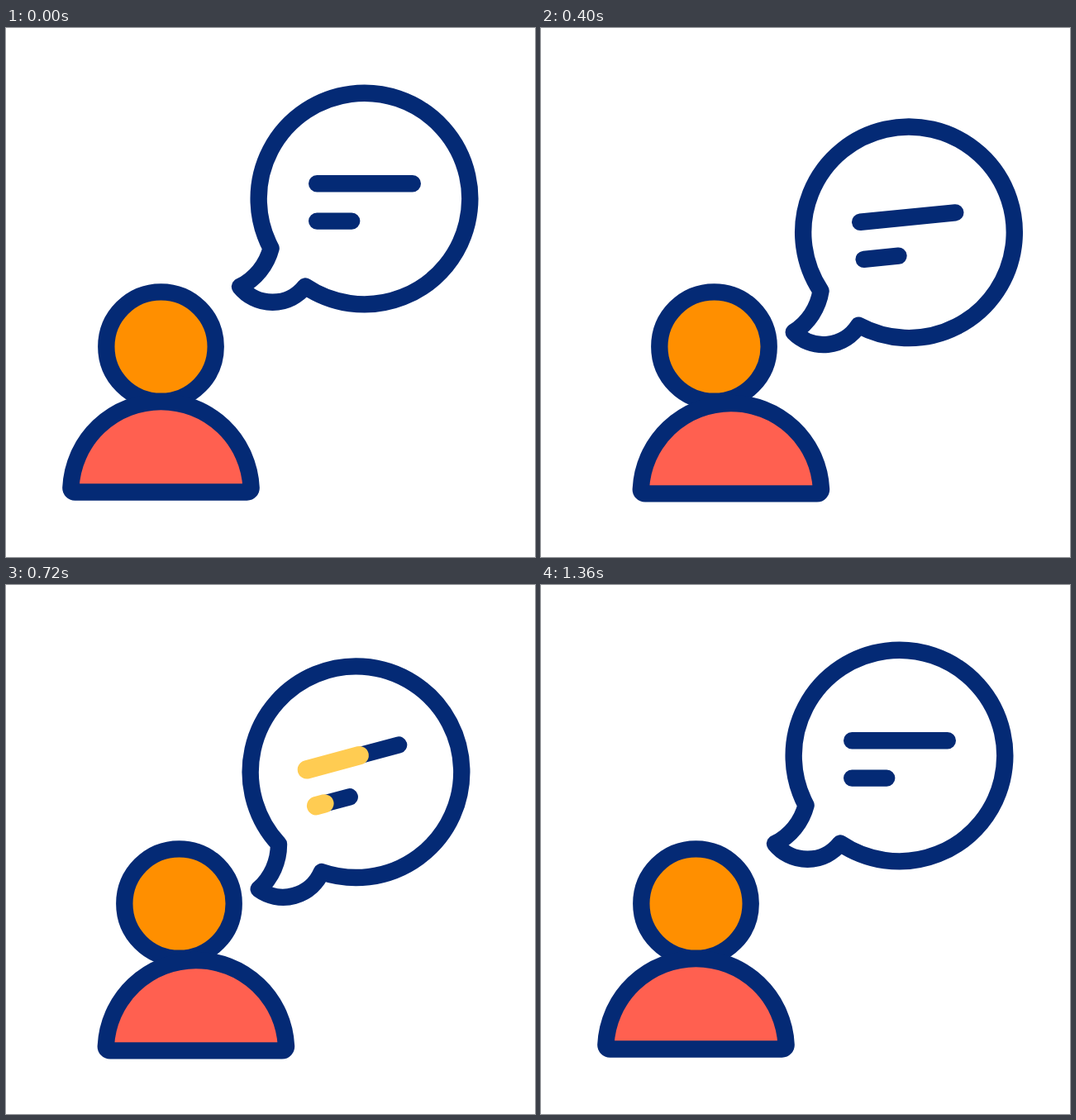
Write an HTML page that moves like this. It is 640x640 px and loops after 1480 ms.

```html
<!DOCTYPE html>
<html lang="en">
<head>
<meta charset="utf-8">
<title>Person talking</title>
<style>
  html, body { margin: 0; width: 100%; height: 100%; overflow: hidden; background: #fff; }
  svg { display: block; width: 100%; height: 100%; }
  .ink { stroke: #042a75; stroke-width: 20.4; stroke-linecap: round; stroke-linejoin: round; }
  .glow { stroke: #ffcc52; stroke-width: 22.5; stroke-linecap: round; }
</style>
</head>
<body>
<svg viewBox="0 0 640 640">
  <circle id="head" class="ink" fill="#ff8f00" cx="187.5" cy="385.6" r="66.2"/>
  <path id="body" class="ink" fill="#ff6050"
    d="M83.6 561.5H291.5A5.2 5.2 0 0 0 296.6 556A109.23 109.23 0 0 0 78.4 556A5.2 5.2 0 0 0 83.6 561.5Z"/>
  <g id="bubble" fill="none">
    <path class="ink" d="M320.6 266.5A127.8 127.8 0 1 1 362 312.5A50.5 50.5 0 0 1 283 313A72 72 0 0 0 320.6 266.5Z"/>
    <path class="ink" d="M376.2 188.3H491.8M376.2 233.6H418.2"/>
    <line id="long" class="glow" y1="188.3" y2="188.3"/>
    <line id="short" class="glow" y1="233.6" y2="233.6"/>
  </g>
</svg>
<script>
const LOOP = 1480, STEP = 40;
const TIP = [283, 313];

// Each track is a list of [ms, value] with a sine ease between keys.
const tracks = {
  person: [[85, 0], [280, 1], [1020, 1], [1350, 0]],
  shift: [[90, 0], [283, 1], [1040, 1], [1360, 0]],
  tilt: [[90, 0], [310, -15], [505, 6.3], [705, -15], [1020, -15], [1350, 0]]
};
const bars = [
  { id: "long", x: 376.2, len: 115.6, head: [[490, 0], [910, 1]], tail: [[700, 0], [1155, 1]] },
  { id: "short", x: 376.2, len: 42, head: [[590, 0], [980, 1]], tail: [[830, 0], [1195, 1]] }
];

const el = id => document.getElementById(id);
const ease = p => (1 - Math.cos(Math.PI * p)) / 2;

function at(keys, t) {
  if (t <= keys[0][0]) return keys[0][1];
  for (let i = 1; i < keys.length; i++) {
    const [t0, a] = keys[i - 1], [t1, b] = keys[i];
    if (t < t1) return a + (b - a) * ease((t - t0) / (t1 - t0));
  }
  return keys[keys.length - 1][1];
}

function draw(t) {
  const p = at(tracks.person, t), s = at(tracks.shift, t), r = at(tracks.tilt, t);
  el("head").setAttribute("transform", `translate(${22 * p} 0)`);
  el("body").setAttribute("transform", `translate(${42.4 * p} ${1.9 * p})`);
  el("bubble").setAttribute("transform", `translate(${22.7 * s} ${55 * s}) rotate(${r} ${TIP})`);
  for (const { id, x, len, head, tail } of bars) {
    const a = at(tail, t), b = at(head, t), bar = el(id);
    bar.setAttribute("x1", x + len * a);
    bar.setAttribute("x2", x + len * b);
    bar.style.display = b > a ? "" : "none";
  }
}

const start = performance.now();
function tick() {
  const t = (performance.now() - start) % LOOP;
  draw(Math.floor(t / STEP) * STEP);
  requestAnimationFrame(tick);
}
tick();
</script>
</body>
</html>
```
